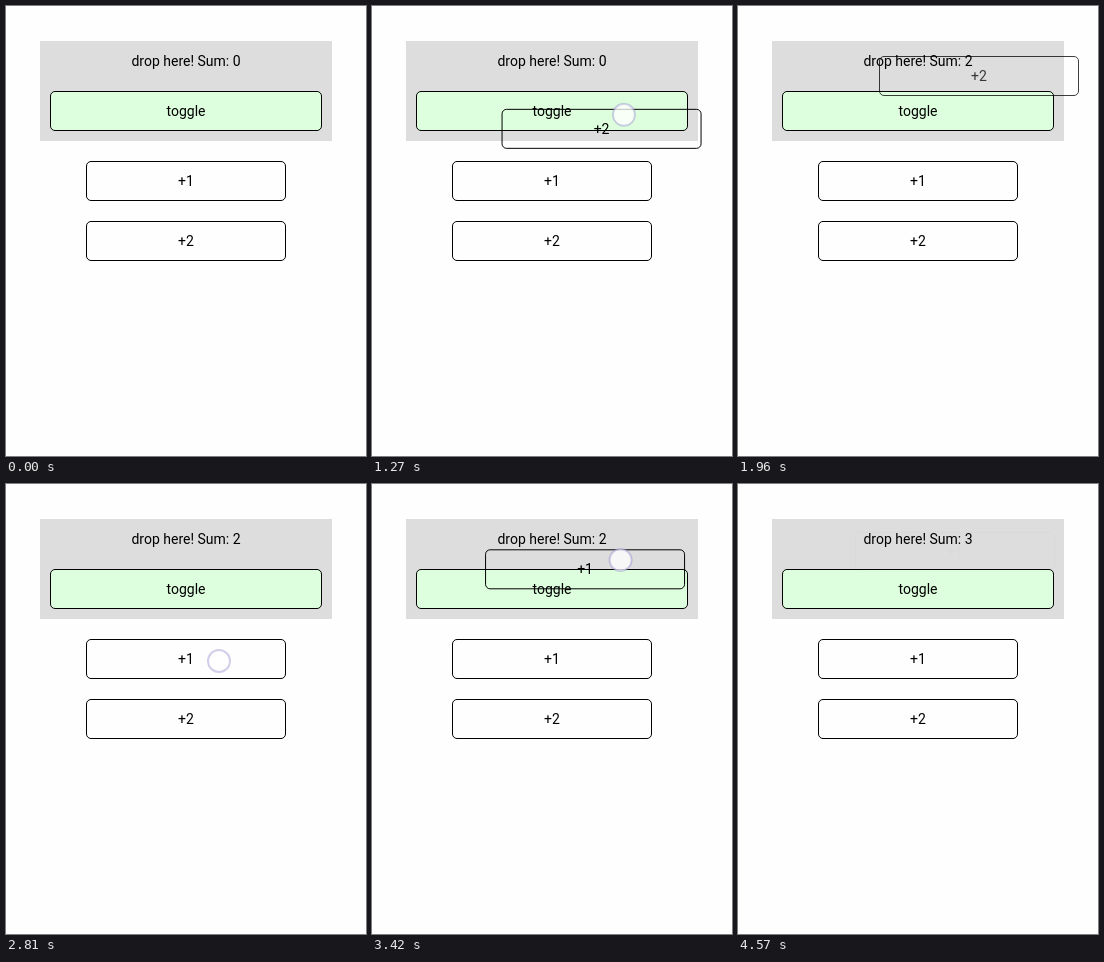
An HTML page for the animation above (4960 ms loop, 360 by 450 pixels).

```html
<!DOCTYPE html>
<html lang="en">
<head>
<meta charset="utf-8">
<title>Drag and drop sum</title>
<style>
  html, body { margin: 0; width: 100%; height: 100%; overflow: hidden; background: #fefefe; }
  svg { display: block; width: 360px; height: 450px; }
  text { font: 14px Roboto, sans-serif; text-anchor: middle; }
  .button { fill: none; stroke: #000; }
  .toggle { fill: #dfd; }
  #pointer { fill: rgba(255, 255, 255, .75); stroke: rgba(150, 140, 205, .42); stroke-width: 2; }
</style>
</head>
<body>
<svg viewBox="0 0 360 450">
  <rect x="34" y="35" width="292" height="100" fill="#ddd"/>
  <rect class="button toggle" x="44.5" y="85.5" width="271" height="39" rx="4.5"/>
  <text x="180" y="110">toggle</text>
  <text id="sum" x="180" y="60"></text>
  <rect class="button" x="80.5" y="155.5" width="199" height="39" rx="4.5"/>
  <text x="180" y="180">+1</text>
  <rect class="button" x="80.5" y="215.5" width="199" height="39" rx="4.5"/>
  <text x="180" y="240">+2</text>
  <g id="copy">
    <rect class="button" x=".5" y=".5" width="199" height="39" rx="4.5"/>
    <text id="copyLabel" x="100" y="25"></text>
  </g>
  <circle id="pointer" r="11"/>
</svg>
<script>
const LOOP = 4960, FADE = 900, POINTER_FADE = 180;
const LAG = 85; // the dragged copy trails the pointer by this many ms

// path rows: time, x, y of the copy's top left corner
const drags = [
  { label: '+2', press: 500, release: 1740, grip: [119, 18], path: [
    [620, 80, 215], [810, 94, 193], [1000, 109.5, 163], [1270, 129.5, 103],
    [1540, 137.5, 71], [1640, 140.5, 57], [1740, 141, 50]] },
  { label: '+1', press: 2810, release: 3680, grip: [133, 22], path: [
    [2920, 80, 155], [3190, 102.5, 108], [3310, 108.5, 86],
    [3450, 114, 61], [3600, 117, 48]] }
];

const $ = id => document.getElementById(id);
const clamp = v => Math.min(1, Math.max(0, v));

function slope(path, i, axis) {
  const a = path[i - 1], b = path[i + 1];
  return a && b ? (b[axis] - a[axis]) / (b[0] - a[0]) : 0;
}

// Cubic Hermite curve through the path, at rest at both ends
function position(path, time) {
  let i = 0;
  while (i < path.length - 2 && time > path[i + 1][0]) i++;
  const a = path[i], b = path[i + 1], span = b[0] - a[0];
  const u = clamp((time - a[0]) / span), v = 1 - u;
  return [1, 2].map(axis =>
    v * v * (1 + 2 * u) * a[axis] + u * u * (3 - 2 * u) * b[axis] +
    span * u * v * (v * slope(path, i, axis) - u * slope(path, i + 1, axis)));
}

function place(element, [x, y], opacity) {
  element.setAttribute('transform', `translate(${x} ${y})`);
  element.setAttribute('opacity', opacity);
}

function draw(t) {
  const sum = t < drags[0].release ? 0 : t < drags[1].release ? 2 : 3;
  $('sum').textContent = 'drop here! Sum: ' + sum;

  const { label, press, release, grip, path } = drags[t < drags[1].press ? 0 : 1];
  const remaining = length => t < press ? 0 : clamp(1 - (t - release) / length);
  const tip = position(path, t + LAG).map((v, i) => v + grip[i]);
  $('copyLabel').textContent = label;
  place($('copy'), position(path, t), t < path[0][0] ? 0 : remaining(FADE));
  place($('pointer'), tip, remaining(POINTER_FADE));
}

const start = performance.now();
function frame() {
  draw((performance.now() - start) % LOOP);
  requestAnimationFrame(frame);
}
frame();
</script>
</body>
</html>
```
